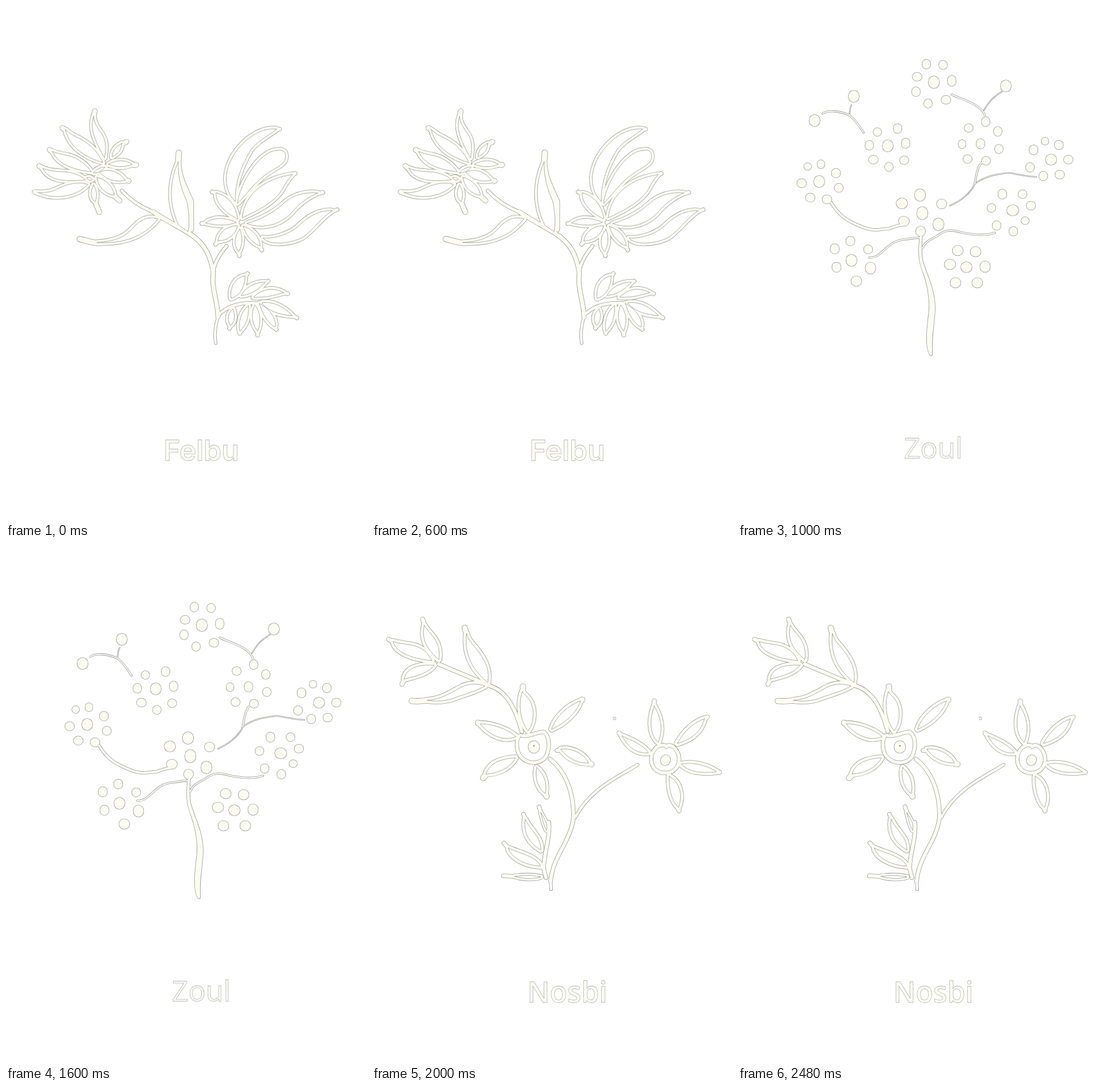
Recreate the animation shown at these times as an HTML page. Size 625x895 px, loop 2.8 s.

```html
<!DOCTYPE html>
<html lang="en">
<head>
<meta charset="utf-8">
<title>Three plants</title>
<style>
html, body { margin: 0; width: 100%; height: 100%; overflow: hidden; background: #fff; }
svg { display: block; width: 100%; height: 100%; }

/* Each drawing is stacked: grey edge, ivory body, then white leaf openings. */
path { stroke-width: calc((var(--w) * var(--wall) + var(--rim)) * 1px); stroke-linecap: round; stroke-linejoin: round; }
.edge { stroke: #98989a; fill: none; --wall: 1; --rim: 1.6; }
.body { stroke: #fcfdf0; fill: #fcfdf0; --wall: 1; --rim: 0; }
.open { stroke: #98989a; fill: #fff; --wall: 0; --rim: .8; }
text { font: 600 50px "Open Sans", sans-serif; text-anchor: middle; fill: #fcfdf0; stroke: #b4b4b0; stroke-width: .8px; }
.round { font: 600 49.5px Inter, sans-serif; }
.light { font-weight: 500; }

.scene { visibility: hidden; animation: 2.8s step-end infinite; }
#one { animation-name: first; }
#two { animation-name: second; }
#three { animation-name: third; }
@keyframes first { 0% { visibility: visible; } 35.7143% { visibility: hidden; } }
@keyframes second { 0% { visibility: hidden; } 35.7143% { visibility: visible; } 71.4286% { visibility: hidden; } }
@keyframes third { 0% { visibility: hidden; } 71.4286% { visibility: visible; } }
</style>
</head>
<body>
<svg viewBox="0 0 625 895">
<defs>
  <g id="thistle-leaves" style="--w:9">
    <!-- left bloom -->
    <path d="M152 192C146 212 152 230 171 264C175 240 172 230 164 219C157 209 153 203 152 192Z"/>
    <path d="M103 215C108 235 122 258 168 272C157 248 140 237 125 229C114 224 109 220 103 215Z"/>
    <path d="M81 253C88 270 108 284 148 288C140 277 128 265 108 260C97 258 88 256 81 253Z"/>
    <path d="M64 282C72 300 95 307 138 302C128 293 112 288 95 288C80 287 70 285 64 282Z"/>
    <path d="M56 324C80 336 120 334 142 310C120 304 100 312 85 320C75 324 65 325 56 324Z"/>
    <path d="M201 239C189 245 185 252 184 262C194 257 200 252 201 239Z"/>
    <path d="M178 275C190 268 205 266 219 275C205 281 190 280 178 275Z"/>
    <path d="M163 289C176 281 198 288 207 303C190 306 175 303 163 289Z"/>
    <path d="M158 298C170 300 186 312 188 329C174 327 160 316 158 298Z"/>
    <path d="M152 311C145 324 148 336 155 340C159 328 157 320 152 311Z"/>
    <path d="M152 290C158 282 166 280 172 280C166 287 160 290 152 290Z"/>
    <path d="M140 299C143 297 147 298 150 301C147 304 143 303 140 299Z"/>
    <!-- stem leaves -->
    <path d="M299 271C286 300 280 340 300 381L316 392C320 375 316 350 314 340C303 315 298 295 299 271Z"/>
    <path d="M158 411C195 409 210 398 223 383C234 371 248 365 264 370C243 395 215 414 158 411Z"/>
    <!-- right bloom -->
    <path d="M470 214C425 208 370 270 385 318C388 328 393 334 398 340C397 305 410 275 425 250C437 234 455 226 470 214Z"/>
    <path d="M470 251C440 252 405 310 402 343C420 325 430 308 452 292C470 280 483 275 485 265C487 252 480 249 470 251Z"/>
    <path d="M497 293C450 300 415 325 410 368C450 350 470 335 480 318C486 307 490 300 497 293Z"/>
    <path d="M541 325C510 322 490 335 480 345C460 362 440 372 418 378C440 386 470 385 495 360C510 342 525 332 541 325Z"/>
    <path d="M566 356C540 354 520 370 505 385C485 400 460 405 446 403C455 415 490 415 515 402C535 388 545 370 566 356Z"/>
    <path d="M365 325C363 340 378 358 402 370C400 350 388 330 365 325Z"/>
    <path d="M347 377C360 366 382 368 400 376C385 382 365 382 347 377Z"/>
    <path d="M368 408C370 392 385 382 402 382C398 398 385 408 368 408Z"/>
    <path d="M406 388C395 402 396 418 404 427C411 415 411 400 406 388Z"/>
    <path d="M412 383C417 400 428 412 441 417C440 400 428 388 412 383Z"/>
    <!-- low sprig -->
    <path d="M415 469C397 472 388 490 391 508C405 504 415 490 415 469Z"/>
    <path d="M450 480C430 480 415 490 408 503C425 502 440 492 450 480Z"/>
    <path d="M482 498C460 486 440 495 430 506C450 507 465 503 482 498Z"/>
    <path d="M497 538C480 520 460 513 444 516C455 530 475 537 497 538Z"/>
    <path d="M440 517C445 535 455 552 467 558C470 545 460 528 440 517Z"/>
    <path d="M432 520C424 535 428 555 437 565C443 550 442 532 432 520Z"/>
    <path d="M421 521C408 530 403 550 406 565C417 555 422 540 421 521Z"/>
    <path d="M394 527C383 535 385 550 390 555C398 548 398 535 394 527Z"/>
  </g>
  <g id="thistle-stems" fill="none">
    <path style="--w:5" d="M201 321C212 333 228 347 256 358M383 417C372 430 362 445 360 462M368 538C385 520 410 514 438 517"/>
    <path style="--w:7" d="M256 358C280 374 300 384 318 395C345 412 356 435 360 465C356 490 368 515 368 540"/>
    <path style="--w:4" d="M368 540C362 560 362 575 364 586"/>
    <path style="--w:8" d="M154 183L152 193M98 212L104 216M76 250L82 254M58 278L64 283M50 323L58 326M209 236L201 240M226 276L218 276M213 304L206 302M197 338L188 330M162 358L156 344"/>
    <path style="--w:9" d="M300 255L299 272C300 300 312 318 321 340V388M128 405C140 408 150 412 162 412"/>
    <path style="--w:6" d="M475 214L468 214M502 291L496 294M550 324L542 326M575 354L566 357M358 323L365 326M340 378L348 377M364 414L369 408M405 434L404 428M444 424L441 418"/>
    <path style="--w:6" d="M419 465L415 470M455 478L450 480M489 500L482 498M505 542L497 538M469 562L467 558M437 572V566M406 569V564M388 560L390 555"/>
  </g>

  <path id="trunk" style="--w:0" d="M316 398C312 430 314 445 322 465C334 500 333 525 330 545C327 570 326 595 333 606C336 610 338 606 337 600C336 570 342 545 342 525C342 490 326 465 320 440C318 425 319 410 320 398Z"/>
  <g id="berries" fill="none">
    <path style="--w:4" d="M162 342C170 355 180 368 200 377C222 388 235 391 250 388L262 387C270 384 280 380 290 380"/>
    <path style="--w:2" d="M228 437C248 440 255 412 285 406C300 405 308 402 317 403M446 394C430 400 410 398 390 394C370 388 360 388 345 400C330 408 325 410 320 421"/>
    <path style="--w:2" d="M411 309C414 295 415 275 427 270M371 154C395 165 425 172 429 192M147 187C155 180 175 182 194 190C205 200 212 210 218 220"/>
    <path style="--w:1" d="M368 347C385 340 405 325 411 309C430 295 450 292 470 290C490 293 505 297 518 297M427 181C435 168 440 160 458 149M194 189C193 182 194 178 197 172"/>
    <!-- berries: round caps on very short strokes -->
    <path style="--w:14" d="M327 100v2M356 102v1M310 123h2M371 128v4M309 148v2M360 163h2M330 169v1"/>
    <path style="--w:18" d="M340 131v3M465 138v2M201 156v2M133 198v2M260 242v2M543 267h1M141 304v2M476 355h2M197 441v2M396 454h1"/>
    <path style="--w:14" d="M242 219h0M277 212v2M228 241v2M291 237v3M234 267h2M288 268h1M262 279v1"/>
    <path style="--w:14" d="M400 212h1M430 200v2M451 217v2M421 238v3M453 248v1M398 266h1M430 269h1"/>
    <path style="--w:12.5" d="M533 235h0M121 279h0M498 373h1M389 239v2M144 274v2"/>
    <path style="--w:14.5" d="M557 241v1M513 249v2M573 267h1M507 280v1M530 295v1M558 293h1"/>
    <path style="--w:15" d="M170 290v1M110 308h1M175 316h0M125 333h1M154 336h1"/>
    <path style="--w:18" d="M316 327v3M284 343h1M320 358v4M348 378v3"/>
    <path style="--w:16" d="M353 344h1M287 374h2M317 391v1"/>
    <path style="--w:14.5" d="M459 326v2M494 327h0M440 351h0M508 347h1M449 381v1M478 391v1"/>
    <path style="--w:15" d="M195 408v1M168 421v2M226 423h0M171 453v2"/>
    <path style="--w:17" d="M230 454v3M205 478h1M381 425h1M412 427h1M367 449h2M429 452v2M377 481h1M415 481h1"/>
  </g>

  <g id="daisy-leaves" style="--w:10">
    <path d="M37 161C40 178 65 190 104 194C95 175 80 168 62 166C50 164 42 163 37 161Z"/>
    <path d="M91 133C85 155 95 175 116 192C119 175 113 160 104 150C98 143 94 138 91 133Z"/>
    <path d="M56 226C58 210 75 200 108 202C98 215 80 220 56 226Z"/>
    <path d="M164 147C160 185 175 210 201 232C206 205 190 185 180 172C171 162 166 156 164 147Z"/>
    <path d="M96 263C120 262 140 248 155 240C170 233 185 234 196 238C180 248 160 252 145 258C128 265 112 265 96 263Z"/>
    <!-- left bloom -->
    <path style="--w:12" d="M258 327C270 331 285 322 297 321C306 328 306 350 297 362C283 374 258 368 255 345C254 335 255 330 258 327Z"/>
    <path d="M261 248C253 270 258 300 271 316C283 300 282 275 273 262C268 255 263 252 261 248Z"/>
    <path d="M312 313C318 292 340 272 362 264C355 285 335 303 312 313Z"/>
    <path d="M328 348C345 345 368 355 376 372C358 372 340 365 328 348Z"/>
    <path d="M188 304C205 303 235 312 250 326C230 335 205 325 188 304Z"/>
    <path d="M198 391C203 372 225 364 249 363C240 380 220 390 198 391Z"/>
    <path d="M286 380C282 400 290 418 301 425C304 405 298 390 286 380Z"/>
    <!-- low sprig -->
    <path d="M237 520C240 535 265 550 293 551C285 535 260 530 237 520Z"/>
    <path d="M266 470C262 495 275 512 293 523C294 500 275 490 266 470Z"/>
    <path style="--w:7" d="M293 458C297 475 300 484 303 489C306 478 300 470 293 458Z"/>
    <path style="--w:8" d="M248 569C265 567 280 567 293 570C280 574 262 573 248 569Z"/>
    <!-- right bloom -->
    <path style="--w:12" d="M488 365C488 352 497 343 507 344L510 348L516 344C525 347 530 356 530 366C529 380 520 386 509 386C497 386 488 379 488 365Z"/>
    <path d="M490 273C480 300 484 325 497 336C505 315 503 295 490 273Z"/>
    <path d="M577 295C555 303 540 320 530 338C550 332 570 322 577 295Z"/>
    <path d="M537 374C555 370 580 375 598 387C575 390 550 388 537 374Z"/>
    <path d="M516 395C515 420 522 440 532 449C540 430 535 405 516 395Z"/>
    <path d="M434 325C450 332 470 340 480 354C460 356 445 345 434 325Z"/>
  </g>
  <g id="daisy-stems" fill="none">
    <path style="--w:6" d="M116 200C150 215 170 222 205 238C235 247 250 280 260 317M309 365C335 385 350 420 350 465C345 510 315 530 310 577M307 475C310 500 298 530 298 555L302 571"/>
    <path style="--w:4.5" d="M461 375C430 395 380 415 353 466M310 575L311 591"/>
    <path style="--w:7" d="M29 157L38 162M88 122L92 135M52 235L57 226"/>
    <path style="--w:9" d="M69 264C80 265 90 264 98 263M161 137L164 148M262 239V250M365 262L358 267M381 374L374 371M184 302L190 305M193 398L199 391M303 430L301 424"/>
    <path style="--w:6" d="M229 511L238 521M263 461L267 471M290 448L294 460M228 568L250 569M321 350L328 350"/>
    <path style="--w:7" d="M490 264V274M582 292L576 296M603 388L596 386M533 455L531 448M429 320L435 326"/>
  </g>
  <g id="daisy-hearts" fill="none">
    <path style="--w:19" d="M281 343v2"/>
    <path style="--w:16" d="M510 366l-1 2"/>
  </g>
</defs>

<g id="one" class="scene">
  <g class="edge"><use href="#thistle-leaves"/><use href="#thistle-stems"/></g>
  <g class="body"><use href="#thistle-leaves"/><use href="#thistle-stems"/></g>
  <use class="open" href="#thistle-leaves"/>
  <text class="round" x="339" y="790">Felbu</text>
</g>
<g id="two" class="scene">
  <g class="edge"><use href="#trunk"/><use href="#berries"/></g>
  <g class="body"><use href="#trunk"/><use href="#berries"/></g>
  <text class="light" x="339" y="786">Zoul</text>
</g>
<g id="three" class="scene">
  <g class="edge"><use href="#daisy-leaves"/><use href="#daisy-stems"/></g>
  <g class="body"><use href="#daisy-leaves"/><use href="#daisy-stems"/></g>
  <use class="open" href="#daisy-leaves"/>
  <use class="edge" href="#daisy-hearts"/>
  <use class="body" href="#daisy-hearts"/>
  <circle cx="281" cy="342" r="1.4" fill="#98989a"/>
  <circle cx="421" cy="294.5" r="2.5" fill="#fcfdf0" stroke="#98989a" stroke-width=".8"/>
  <text x="339" y="788">Nosbi</text>
</g>
</svg>
</body>
</html>
```
